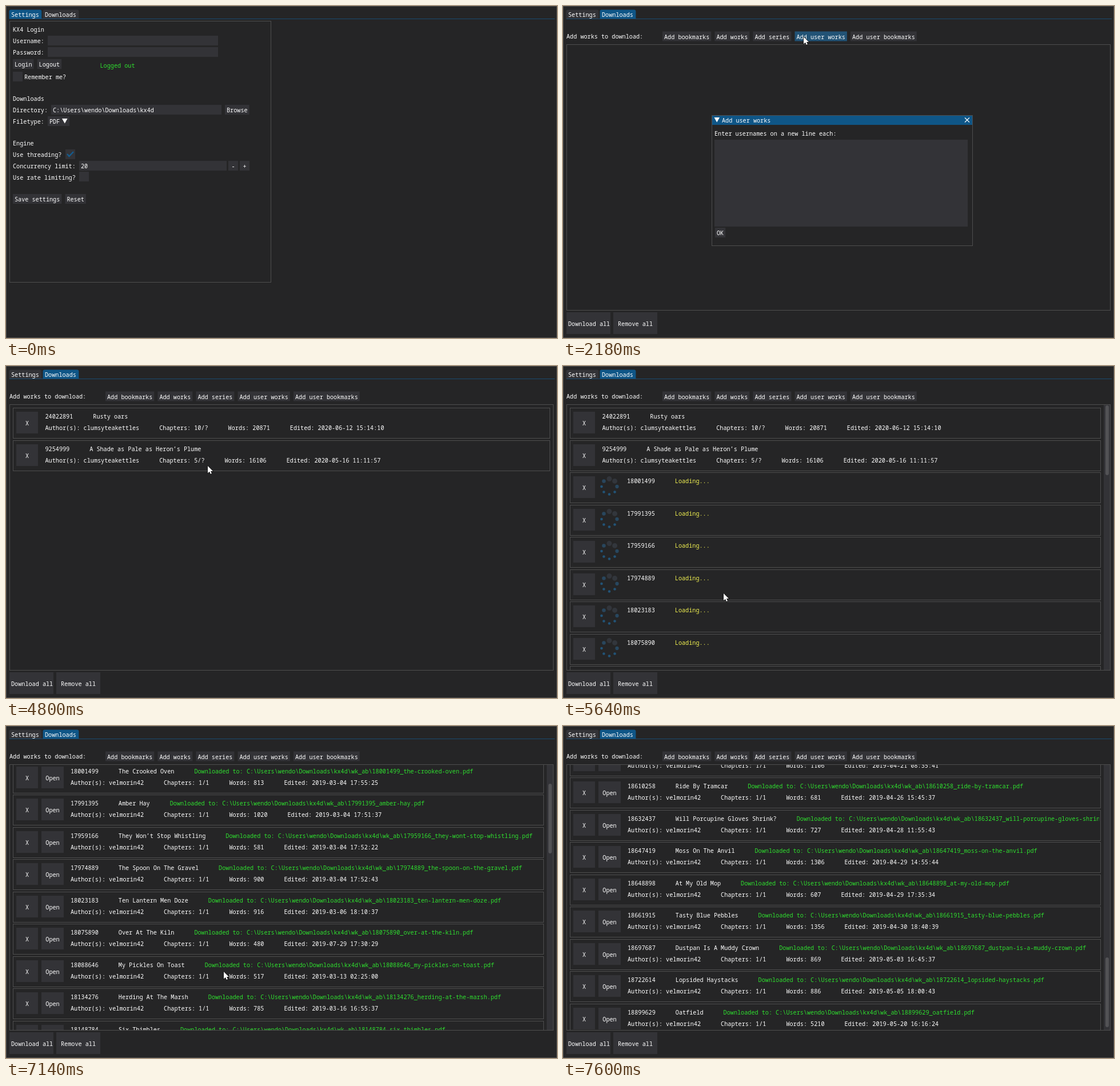
Recreate the animation shown at these times as an HTML page with a canvas. Size 964 px wide and 581 px high, loop 7.92 s.

```html
<!DOCTYPE html>
<html lang="en">
<head>
<meta charset="utf-8">
<title>Work downloader</title>
<style>
html, body { margin: 0; width: 100%; height: 100%; overflow: hidden; background: #252526; }
canvas { display: block; }
</style>
</head>
<body>
<canvas id="stage" width="964" height="581"></canvas>
<script>
const ctx = document.getElementById('stage').getContext('2d');
const LOOP = 7920, CELL = 6.1, GAP = 35;
const BG = '#252526', FRAME = '#333337', BORDER = '#4e4e4e', BLUE = '#0f5687',
      HOVER = '#225376', WHITE = '#fff', GREEN = '#2fe02f', YELLOW = '#f0f050';
const FOLDER = 'C:\\Users\\wendo\\Downloads\\kx4d';

ctx.font = '300 10.17px "Noto Sans Mono", "DejaVu Sans Mono", monospace';
ctx.letterSpacing = (CELL - ctx.measureText('0'.repeat(50)).width / 50) + 'px';

// id | title | words | edited; rows with only a title get made-up details
const works = `24022891|Rusty oars|20871|2020-06-12 15:14:10
9254999|A Shade as Pale as Heron’s Plume|16106|2020-05-16 11:11:57
18001499|The Crooked Oven|813|2019-03-04 17:55:25
17991395|Amber Hay|1020|2019-03-04 17:51:37
17959166|They Won’t Stop Whistling|581|2019-03-04 17:52:22
17974889|The Spoon On The Gravel|900|2019-03-04 17:52:43
18023183|Ten Lantern Men Doze|916|2019-03-06 18:10:37
18075890|Over At The Kiln|480|2019-07-29 17:30:29
18088646|My Pickles On Toast|517|2019-03-13 02:25:00
18134276|Herding At The Marsh|785|2019-03-16 16:55:37
18148784|Six Thimbles|640|2019-03-17 19:20:11
Paper Ladders
The Borrowed Kettle
Nine Wet Umbrellas
Chalk On The Ferry
A Drawer Of Corks
Slow Gravy
Beneath The Woodpile
Two Left Galoshes
Parsnip Weather
The Quiet Ironmonger
Buttons For Supper
18571030|Marmalade Fog|1106|2019-04-21 08:35:41
18610258|Ride By Tramcar|681|2019-04-26 15:45:37
18632437|Will Porcupine Gloves Shrink?|727|2019-04-28 11:55:43
18647419|Moss On The Anvil|1306|2019-04-29 14:55:44
18648898|At My Old Mop|607|2019-04-29 17:35:34
18661915|Tasty Blue Pebbles|1356|2019-04-30 18:40:39
18697687|Dustpan Is A Muddy Crown|869|2019-05-03 16:45:37
18722614|Lopsided Haystacks|886|2019-05-05 18:00:43
18899629|Oatfield|5210|2019-05-20 16:16:24`.split('\n').map((line, k) => {
  let [id, title, words, edited] = line.split('|');
  if (!title) {
    title = id;
    id = 18148784 + (k - 10) * 35203;
    words = 480 + k * 397 % 900;
    edited = `2019-0${k < 16 ? 3 : 4}-${k < 16 ? k + 9 : k - 6} 17:${k + 20}:37`;
  }
  const slug = title.toLowerCase().replace(/[^a-z ]/g, '').replaceAll(' ', '-');
  return { id: String(id), title, words, edited, path: `${FOLDER}\\wk_ab\\${id}_${slug}.pdf`,
    author: k < 2 ? 'clumsyteakettles' : 'velmorin42',
    chapters: k < 2 ? ['10/?', '5/?'][k] : '1/1',
    loaded: [4100, 4260, 6100, 6420, 6200, 6440, 6460, 6340][k] ?? 6400,
    saved: 6880 + k * 37 % 11 * 20 };
});

// Pointer path: time, x, y
const path = [
  [480, 289, 330], [760, 80, 337], [1260, 94, 25], [1340, 97, 17], [1620, 97, 17],
  [2060, 421, 54], [2200, 421, 54], [2400, 377, 290], [3320, 377, 290], [3400, 341, 394],
  [3480, 310, 402], [3580, 277, 398], [3760, 277, 398], [4380, 353, 175], [4800, 353, 175],
  [5040, 440, 54], [5100, 440, 54], [5240, 400, 300], [5480, 400, 300], [5580, 281, 398],
  [6620, 281, 398], [6780, 50, 556], [6860, 50, 556], [7080, 381, 430], [7500, 381, 430],
  [7600, 430, -20]
];
let now, mouse;

function pointerAt(t) {
  const i = path.findIndex(p => p[0] > t);
  if (i < 1) return { x: -99, y: -99 };
  const [t0, x0, y0] = path[i - 1], [t1, x1, y1] = path[i];
  const u = (t - t0) / (t1 - t0), e = u * u * (3 - 2 * u);
  return { x: x0 + (x1 - x0) * e, y: y0 + (y1 - y0) * e };
}

function fill(x, y, w, h, color = FRAME, radius = 0) {
  ctx.fillStyle = color;
  ctx.beginPath();
  ctx.roundRect(x, y, w, h, radius);
  ctx.fill();
}

function outline(x, y, w, h) {
  ctx.strokeStyle = BORDER;
  ctx.lineWidth = 1;
  ctx.strokeRect(x + .5, y + .5, w, h);
}

function clip(x, y, w, h, paint) {
  ctx.save();
  ctx.beginPath();
  ctx.rect(x, y, w, h);
  ctx.clip();
  paint();
  ctx.restore();
}

function poly(color, ...points) {
  ctx.fillStyle = color;
  ctx.beginPath();
  for (let i = 0; i < points.length; i += 2) ctx.lineTo(points[i], points[i + 1]);
  ctx.closePath();
  ctx.fill();
}

function line(color, width, ...points) {
  ctx.strokeStyle = color;
  ctx.lineWidth = width;
  ctx.beginPath();
  for (let i = 0; i < points.length; i += 2) ctx.lineTo(points[i], points[i + 1]);
  ctx.stroke();
}

// Writes text around the middle line y and returns its right end
function text(str, x, y, color = WHITE) {
  ctx.fillStyle = color;
  ctx.fillText(str, x, y + 4);
  return x + str.length * CELL;
}

const hovered = (x, y, w, h) =>
  mouse.x >= x && mouse.x < x + w && mouse.y >= y && mouse.y < y + h;

function button(label, x, y, w = label.length * CELL + 6, h = 17) {
  fill(x, y, w, h, hovered(x, y, w, h) ? HOVER : FRAME);
  text(label, x + Math.max(3, (w - label.length * CELL) / 2), y + h / 2 + .5);
  return x + w + 6.1;
}

function tab(label, x, active) {
  const box = [x - 3.5, 6.5, label.length * CELL + 8, 16];
  fill(...box, hovered(...box) ? HOVER : active ? BLUE : FRAME, [3, 3, 0, 0]);
  text(label, x, 15);
}

function settings() {
  outline(6, 26, 457, 457);
  const labels = [['KX4 Login', 41], ['Username:', 61], ['Password:', 81], ['Downloads', 162],
    ['Directory:', 182], ['Filetype:', 202], ['Engine', 240], ['Use threading?', 260],
    ['Concurrency limit:', 280], ['Use rate limiting?', 300]];
  for (const [label, y] of labels) text(label, 12, y);
  fill(73, 52, 298, 17);
  fill(73, 72, 298, 17);
  button('Logout', button('Login', 12, 93), 93);
  text('Logged out', 164.5, 104, GREEN);
  fill(12, 115, 17, 17);
  text('Remember me?', 32, 124);
  fill(79, 173, 298, 17);
  text(FOLDER, 82, 182);
  button('Browse', 383, 173);
  fill(73, 193, 38, 17);
  text('PDF', 76, 202);
  poly(WHITE, 98, 197, 107.5, 197, 102.8, 205.5);
  fill(104, 251, 17, 17);
  line('#145c8e', 2.5, 107, 259, 110.5, 263, 118, 255);
  fill(128, 271, 258, 17);
  text('20', 131, 280);
  button('-', 389, 271, 17);
  button('+', 409, 271, 17);
  fill(128, 290, 17, 17);
  button('Reset', button('Save settings', 12, 329), 329);
}

function spinner(cx, cy) {
  for (let i = 0; i < 8; i++) {
    const a = i * Math.PI / 4;
    const grow = Math.max(0, Math.cos((now - 6380) * .008 - a));
    const mix = (from, to) => from + (to - from) * grow;
    ctx.fillStyle = `rgb(${mix(34, 51)},${mix(83, 51)},${mix(118, 55)})`;
    ctx.beginPath();
    ctx.arc(cx + 13.5 * Math.sin(a), cy - 13.5 * Math.cos(a), 2.3 * (1 + grow), 0, 7);
    ctx.fill();
  }
}

function row(work, y, width) {
  const loading = now < work.loaded, saved = now >= work.saved;
  const busy = loading || now >= 6820 && !saved;
  outline(12, y, width, 53);
  button('X', 18, y + 7, 38, 38);
  if (saved) button('Open', 62, y + 7, 39, 38);
  if (busy) spinner(81, y + 25);
  const x = saved ? 113 : busy ? 112 : 68.5;
  const top = y + 15, low = y + 35;
  let end = text(work.id, x, top) + GAP;
  if (loading) return text('Loading...', end, top, YELLOW);
  end = text(work.title, end, top) + GAP;
  if (saved)
    clip(12, y, width - 2, 53, () => text('Downloaded to: ' + work.path, end, top, GREEN));
  else if (busy) text('Downloading...', end, top, YELLOW);
  end = text('Author(s): ' + work.author, x, low) + GAP;
  end = text('Chapters: ' + work.chapters, end, low) + GAP;
  end = text('Words: ' + work.words, end, low) + GAP;
  text('Edited: ' + work.edited, end, low);
}

function list() {
  const count = now < 3720 ? 0 : now < 5600 ? 2 : works.length;
  const long = count > 2, width = long ? 928 : 939;
  const notches = Math.max(0, Math.min(21, Math.floor((now - 7088) / 24.2)));
  const scroll = notches * 61.05;
  clip(7, 68, long ? 935 : 951, 464, () => {
    for (let k = 0; k < count; k++) {
      const y = Math.round(73 + 56.5 * k - scroll);
      if (y > 10 && y < 534) row(works[k], y, width);
    }
  });
  if (long) {
    fill(946, 68, 12, 464);
    fill(949, 69 + scroll * .262, 6, 122, '#525255', 3);
  }
  outline(6, 67, 951, 465);
}

function downloads() {
  text('Add works to download:', 6, 53);
  let x = 174;
  for (const label of ['bookmarks', 'works', 'series', 'user works', 'user bookmarks'])
    x = button('Add ' + label, x, 44.5);
  list();
  button('Download all', 6, 536, 77, 38);
  button('Remove all', 88, 536, 77, 38);
}

function popup(name, start, step) {
  fill(260, 191, 457, 229, BG);
  fill(260, 191, 457, 17, BLUE);
  outline(260, 191, 456, 228);
  poly(WHITE, 264.5, 195, 274, 195, 269.2, 203.5);
  text('Add user works', 278, 200);
  line(WHITE, 1.1, 703, 195.5, 711, 203.5);
  line(WHITE, 1.1, 711, 195.5, 703, 203.5);
  text('Enter usernames on a new line each:', 265, 223);
  fill(265, 234, 443, 152);
  if (now >= start) {
    const end = text(name.slice(0, 1 + Math.floor((now - start) / step)), 268, 243);
    fill(Math.floor(end) - 1, 237, 1, 11, WHITE);
  }
  button('OK', 266, 388);
}

function pointer() {
  ctx.save();
  ctx.translate(mouse.x, mouse.y);
  const shape = [0, 0, 0, 12.5, 2.9, 9.8, 4.9, 14, 6.9, 13.1, 5, 9, 9, 9];
  line('#111', 1.4, ...shape, 0, 0);
  poly(WHITE, ...shape);
  ctx.restore();
}

function draw(time) {
  now = time % LOOP;
  mouse = pointerAt(now);
  const main = now >= 1620;
  fill(0, 0, 964, 581, BG);
  outline(0, 0, 963, 580);
  tab('Settings', 9, !main);
  tab('Downloads', 68, main);
  fill(6, 22, 954, 1, '#1a4a70');
  if (main) downloads(); else settings();
  if (now >= 2140 && now < 3720) popup('clumsyteakettles', 2700, 29);
  if (now >= 5080 && now < 5600) popup('velmorin42', 5200, 28);
  pointer();
}

const begin = performance.now();
function tick() {
  draw(performance.now() - begin);
  requestAnimationFrame(tick);
}
tick();
</script>
</body>
</html>
```
